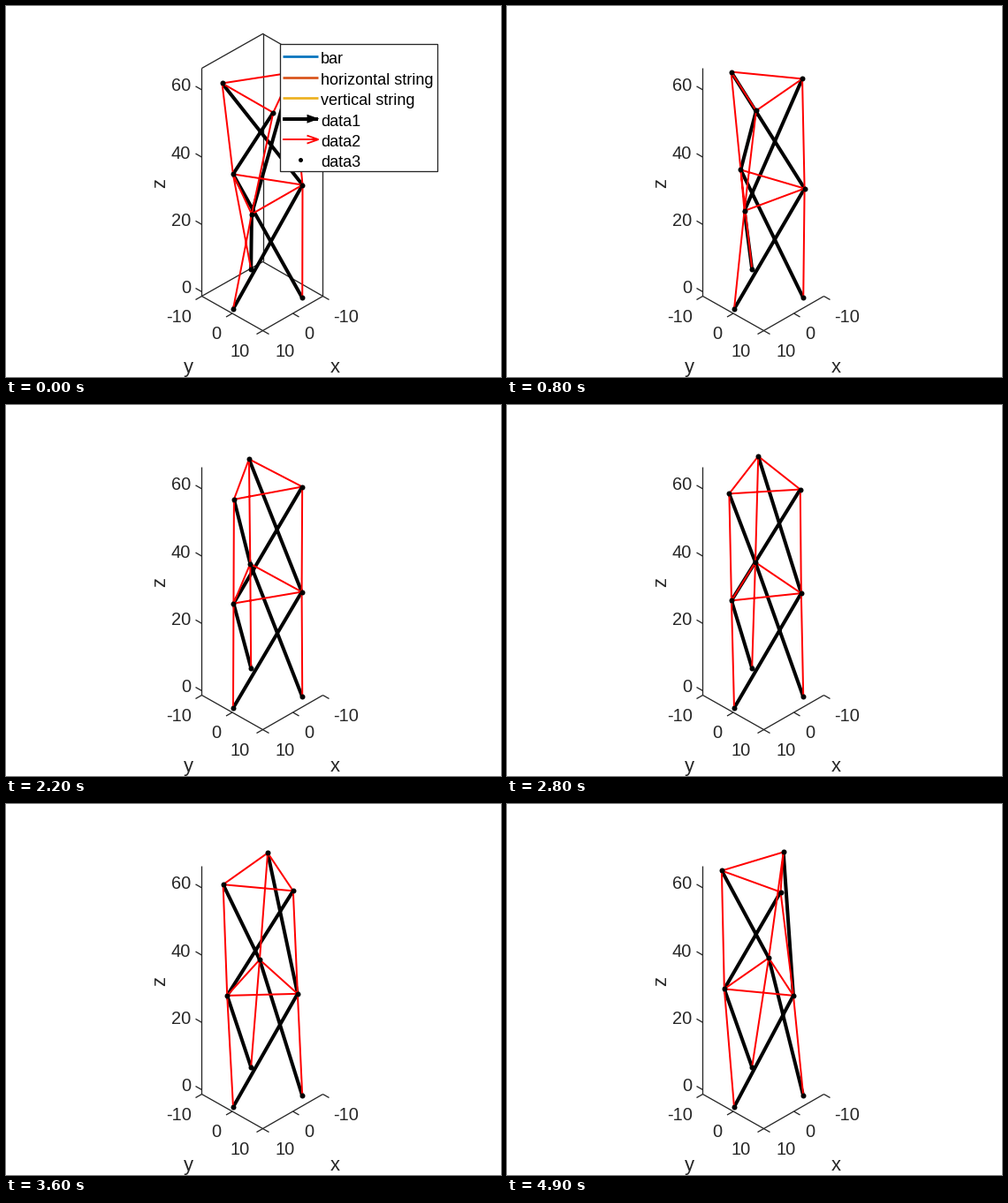
Write a matplotlib script that moves like this. It is 560 px wide and 420 px high and loops after 5000 ms.

```python
import numpy as np
import matplotlib.pyplot as plt
from matplotlib.animation import FuncAnimation
from matplotlib.patches import Polygon, Rectangle

W, H, DPI = 560, 420, 100
FRAMES, INTERVAL = 50, 100
PX = 72 / DPI
INK = "#262626"
SQUASH = 0.574  # vertical foreshortening of horizontal circles
LEFT, MIDDLE, RIGHT = 221, 290, 358  # box edges on screen
TOP, FLOOR, DEPTH = 70, 328, 39

fig = plt.figure(figsize=(W / DPI, H / DPI), dpi=DPI, facecolor="white")
ax = fig.add_axes([0, 0, 1, 1])
ax.set(xlim=(-0.5, W - 0.5), ylim=(H - 0.5, -0.5))
ax.axis("off")


def line(points, color=INK, width=1.3, z=1):
    xs, ys = zip(*points)
    return ax.plot(xs, ys, color=color, lw=width * PX, zorder=z,
                   solid_capstyle="butt", solid_joinstyle="miter")[0]


def label(x, y, text, size, ha="center", z=1, color=INK, **kw):
    return ax.text(x, y, text, fontsize=size * PX, ha=ha, va="baseline",
                   family="Liberation Sans", color=color, zorder=z, **kw)


def draw_axes():
    line([(LEFT, TOP), (LEFT, FLOOR), (MIDDLE, FLOOR + DEPTH), (RIGHT, FLOOR)])
    for value in range(0, 61, 20):
        y = 323 - 3.81 * value
        line([(LEFT, y), (LEFT - 7, y - 4)])
        label(208.5, y + 1.5, value, 20, "right")
    for k, value in enumerate((-10, 0, 10)):
        y = FLOOR + DEPTH * k / 2
        for edge, side, ha in ((LEFT, 1, "right"), (RIGHT, -1, "left")):
            x = edge + k * (MIDDLE - edge) / 2
            line([(x, y), (x - 7 * side, y + 4)])
            label(edge + side * (32.8 * k - 11.3), y + 29.5, f"{value}", 20, ha)
    label(206, 414.5, "y", 22)
    label(372, 414.5, "x", 22)
    label(174.5, 200, "z", 22, rotation=90).set_va("center")


def draw_intro():
    """Box edges and legend, visible only at the start of the loop."""
    back = (MIDDLE, FLOOR - DEPTH)
    peak = (MIDDLE, TOP - DEPTH)
    parts = [
        line([(LEFT, TOP), peak, (RIGHT, TOP), (RIGHT, FLOOR), back, (LEFT, FLOOR)]),
        line([peak, back]),
        ax.add_patch(Rectangle((309, 43), 178, 144, fc="white", ec=INK,
                               lw=1.3 * PX, zorder=10)),
    ]
    entries = (("bar", "#0072BD", 2.7), ("horizontal string", "#D95319", 2.7),
               ("vertical string", "#EDB120", 2.7), ("data1", "black", 4),
               ("data2", "red", 2), ("data3", "black", 0))
    for i, (name, color, width) in enumerate(entries):
        y = 57 + 23.4 * i
        parts.append(label(355.4, y + 8, name, 18, "left", 11, "black"))
        if width:
            parts.append(line([(312, y), (352, y)], color, width, 11))
        if name == "data1":
            parts.append(ax.add_patch(Polygon([(340, y - 5), (354, y), (340, y + 5)],
                                              fc=color, ec="none", zorder=11)))
        elif name == "data2":
            parts.append(line([(340, y - 4.5), (353, y), (340, y + 4.5)], color, 1.8, 11))
        elif name == "data3":
            parts += ax.plot(332, y, "o", color=color, ms=5 * PX, mew=0, zorder=11)
    return parts


draw_axes()
intro = draw_intro()


def ring(cx, cy, radius, degrees):
    a = np.radians(degrees + 120 * np.arange(3))
    return np.column_stack((cx + radius * np.cos(a), cy + SQUASH * radius * np.sin(a)))


def twist(t, start, rate, kick, decay):
    """Steady turning plus an initial surge that dies away."""
    return start + rate * t + kick * (1 - np.exp(-decay * t))


def rings(t):
    return (
        ring(289.3, 323.3, 46.9, 14.4),
        ring(289.6 - 0.3 * t, 209 - 1.9 * t, 47 - 0.26 * t,
             twist(t, -15, 8.8, 11.7, 0.7)),
        ring(289.6 - 0.35 * t, 94 - 3.3 * t - 0.075 * t * t, 47.2 - 0.07 * t * t,
             twist(t, -45, 17.3, 23, 0.8)),
    )


def segments(pairs):
    gap = np.full(2, np.nan)
    return np.array([p for a, b in pairs for p in (a, b, gap)]).T


bars = line([(0, 0)], "black", 4, 3)
strings = line([(0, 0)], "red", 2, 4)
dots, = ax.plot([], [], "o", color="black", ms=6 * PX, mew=0, zorder=5)


def update(frame):
    base, mid, top = rings(frame * INTERVAL / 1000)
    stages = ((base, mid), (mid, top))
    bars.set_data(*segments([(low[k], high[k - 1])
                             for low, high in stages for k in range(3)]))
    strings.set_data(*segments(
        [(low[k], high[k]) for low, high in stages for k in range(3)]
        + [(level[k], level[k - 1]) for level in (mid, top) for k in range(3)]))
    dots.set_data(*np.vstack((base, mid, top)).T)
    for part in intro:
        part.set_visible(frame == 0)
    return [bars, strings, dots, *intro]


anim = FuncAnimation(fig, update, frames=FRAMES, interval=INTERVAL,
                     init_func=lambda: update(0), repeat=True, repeat_delay=0)
plt.show()
```
